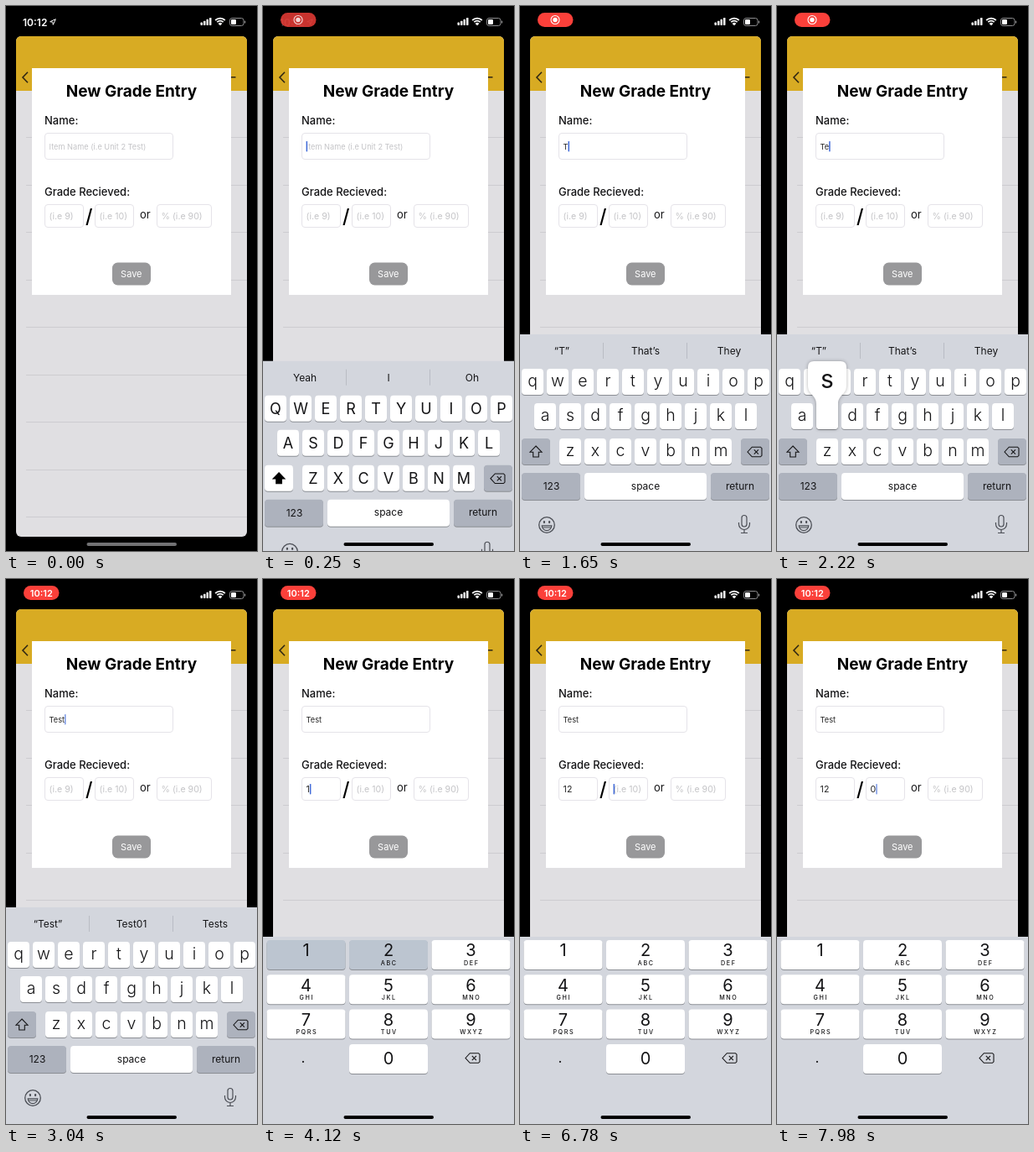
Animation of 300x649 px, one loop 8000 ms. Source, as an HTML page with a canvas:

```html
<!DOCTYPE html>
<html lang="en">
<head>
<meta charset="utf-8">
<title>New Grade Entry</title>
<style>
html, body { margin: 0; width: 100%; height: 100%; overflow: hidden; background: #000; }
canvas { display: block; width: 300px; height: 649px; }
</style>
</head>
<body>
<canvas id="stage"></canvas>
<script>
const W = 300, H = 649, LOOP = 8000;
const canvas = document.getElementById('stage');
const ctx = canvas.getContext('2d');
const ratio = window.devicePixelRatio || 1;
canvas.width = W * ratio;
canvas.height = H * ratio;

const KEYBOARD_BG = '#d3d6dd', DARK_KEY = '#adb2bd', INK = '#141416';

// key, touch down, touch up
const taps = [
  ['t', 1430, 1560], ['e', 1880, 2000], ['s', 2140, 2270], ['t', 2420, 2540],
  ['1', 3930, 4080], ['2', 4100, 4240], ['1', 5000, 5120], ['2', 5170, 5290],
  ['<', 6240, 6360], ['<', 6560, 6680], ['0', 7420, 7480]
];
// time, field index
const focuses = [[60, 0], [3480, 1], [4620, 2]];
const suggestions = [
  [0, 'Yeah', 'I', 'Oh'],
  [1650, '“T”', 'That’s', 'They'],
  [2350, '“Tes”', 'Test', 'Tests'],
  [2620, '“Test”', 'Test01', 'Tests']
];
const fields = [
  { x: 46, y: 151, w: 154, h: 32, size: 9.2, hint: 'Item Name (i.e Unit 2 Test)', base: 170.5 },
  { x: 46, y: 236, w: 47, h: 28, size: 10.6, hint: '(i.e 9)', base: 254 },
  { x: 106, y: 236, w: 47, h: 28, size: 10.6, hint: '(i.e 10)', base: 254 },
  { x: 180, y: 236, w: 66, h: 28, size: 10.6, hint: '% (i.e 90)', base: 254 }
];

const clamp = v => Math.max(0, Math.min(1, v));
const ramp = (t, from, to) => clamp((t - from) / (to - from));
const latest = (list, t) => list.filter(e => e[0] <= t).pop();

function setFont(size, weight) {
  ctx.font = `${weight} ${size}px Inter, Roboto, sans-serif`;
}

function text(str, x, y, size, { weight = 400, color = INK, align = 'center', spacing = 0 } = {}) {
  setFont(size, weight);
  ctx.letterSpacing = spacing + 'px';
  ctx.textAlign = align;
  ctx.fillStyle = color;
  ctx.fillText(str, x + spacing / 2, y);
  ctx.letterSpacing = '0px';
}

function box(x, y, w, h, r, fill) {
  ctx.beginPath();
  ctx.roundRect(x, y, w, h, r);
  ctx.fillStyle = fill;
  ctx.fill();
}

function stroke(color, width, draw) {
  ctx.beginPath();
  draw();
  ctx.strokeStyle = color;
  ctx.lineWidth = width;
  ctx.stroke();
}

function path(points) {
  points.forEach(([x, y], i) => i ? ctx.lineTo(x, y) : ctx.moveTo(x, y));
}

function key(x, y, w, h, fill = '#fff') {
  box(x, y + 1, w, h, 4, '#8b8e94');
  box(x, y, w, h, 4, fill);
}

// Replays focus and taps up to time t
function stateAt(t) {
  const values = ['', '', '', ''];
  const focus = latest(focuses, t);
  let edited = focus ? focus[0] : 0;
  for (const [name, , up] of taps) {
    if (up > t) break;
    const i = latest(focuses, up)[1];
    values[i] = name === '<' ? values[i].slice(0, -1)
      : values[i] + (name === 't' && !values[i] ? 'T' : name);
    edited = Math.max(edited, up);
  }
  return { values, active: focus ? focus[1] : -1, edited };
}

function caretAlpha(since) {
  const s = since % 1000;
  const shown = 1 - ramp(s, 450, 620) + ramp(s, 860, 1000);
  return clamp(shown);
}

function drawStatus(t) {
  const pill = ramp(t, 60, 300), clock = ramp(t, 2500, 2800);
  ctx.globalAlpha = 1 - pill;
  text('10:12', 20, 23.5, 12, { weight: 600, color: '#fff', align: 'left' });
  stroke('#fff', 1, () => { path([[52.7, 18.7], [59.3, 15.7], [56.3, 22.3], [55.8, 19.2]]); ctx.closePath(); });
  ctx.globalAlpha = pill;
  box(21, 8, 42.5, 17, 8.5, '#fb403a');
  ctx.globalAlpha = pill * (1 - clock);
  stroke('#fff', 1.1, () => ctx.arc(42, 16.5, 5, 0, 7));
  box(39.3, 13.8, 5.4, 5.4, 2.7, '#fff');
  ctx.globalAlpha = clock;
  text('10:12', 42.3, 20.6, 11, { weight: 600, color: '#fff' });
  ctx.globalAlpha = 1;

  for (let i = 0; i < 4; i++) {
    const h = 3.4 + i * 1.9;
    box(232.5 + i * 3.5, 23 - h, 2.5, h, 0.7, '#fff');
  }
  for (const r of [8.2, 5.2]) {
    stroke('#fff', 1.8, () => ctx.arc(256, 22.8, r, -Math.PI * 0.75, -Math.PI * 0.25));
  }
  ctx.beginPath();
  ctx.moveTo(256, 23.3);
  ctx.arc(256, 23.3, 3.3, -Math.PI * 0.75, -Math.PI * 0.25);
  ctx.fillStyle = '#fff';
  ctx.fill();
  stroke('#8c8c8e', 1, () => ctx.roundRect(267.5, 14.5, 16.5, 9, 2.6));
  box(269, 16, 6, 6, 1.2, '#fff');
  box(285, 17.5, 1.2, 3, 0.6, '#8c8c8e');
}

function drawPage() {
  box(12, 36, 276, 596, 6, '#e0dfe2');
  box(12, 36, 276, 65, [6, 6, 0, 0], '#d8ab23');
  for (let i = 0; i < 9; i++) {
    box(24, Math.round(156 + i * 56.5), 264, 1, 0, '#cdccd0');
  }
  stroke('#302713', 1.6, () => path([[26, 78.8], [20, 85], [26, 91.2]]));
  stroke('#302713', 1.5, () => path([[268, 84.8], [274.5, 84.8]]));
}

function drawField(f, value, alpha) {
  stroke('#e5e3e9', 1, () => ctx.roundRect(f.x + 0.5, f.y + 0.5, f.w - 1, f.h - 1, 3.5));
  const x = f.x + 5.6;
  text(value || f.hint, x, f.base, f.size, { color: value ? '#222' : '#c4c4c7', align: 'left' });
  if (!alpha) return;
  const end = x + (value ? ctx.measureText(value).width : 0);
  ctx.globalAlpha = alpha;
  box(end, f.base - f.size * 0.36 - 6.3, 1.5, 12.6, 0.7, '#3f69d8');
  ctx.globalAlpha = 1;
}

function drawCard(t, { values, active, edited }) {
  box(31, 74, 238, 270, 0, '#fff');
  text('New Grade Entry', 150, 108, 19, { weight: 700, color: '#000' });
  text('Name:', 46, 141, 13, { weight: 500, align: 'left' });
  text('Grade Recieved:', 46, 226, 13, { weight: 500, align: 'left' });
  text('/', 99.3, 259, 23, { weight: 500, color: '#000' });
  text('or', 160, 253, 13, { align: 'left' });
  fields.forEach((f, i) => drawField(f, values[i], i === active ? caretAlpha(t - edited) : 0));
  const ready = values[0] && values[1] && Number(values[2]) > 0;
  box(127, 305.5, 46, 27, 6.5, ready ? '#75c344' : '#98989a');
  text('Save', 149.8, 323, 11, { color: '#fff' });
}

function drawBackspace(x, y, pressed) {
  const outline = () => {
    path([[x - 8.5, y], [x - 3.2, y - 5.8], [x + 7, y - 5.8], [x + 8.5, y - 4.3],
      [x + 8.5, y + 4.3], [x + 7, y + 5.8], [x - 3.2, y + 5.8]]);
    ctx.closePath();
  };
  stroke(INK, 1.1, outline);
  if (pressed) {
    ctx.fillStyle = INK;
    ctx.fill();
  }
  stroke(pressed ? KEYBOARD_BG : INK, 1.1, () => {
    path([[x - 0.7, y - 2.6], [x + 4.5, y + 2.6]]);
    path([[x + 4.5, y - 2.6], [x - 0.7, y + 2.6]]);
  });
}

function drawShift(on) {
  key(2, 515, 34, 31, on ? '#fff' : DARK_KEY);
  const arrow = () => {
    path([[19, 524], [26, 531.2], [22.3, 531.2], [22.3, 537], [15.7, 537], [15.7, 531.2], [12, 531.2]]);
    ctx.closePath();
  };
  stroke(on ? '#000' : INK, 1.1, arrow);
  if (on) {
    ctx.fillStyle = '#000';
    ctx.fill();
  }
}

function drawPopup(label, x, y) {
  const cx = x + 13, top = y - 50;
  ctx.beginPath();
  ctx.moveTo(cx - 16, top);
  ctx.lineTo(cx + 16, top);
  ctx.quadraticCurveTo(cx + 23, top, cx + 23, top + 7);
  ctx.lineTo(cx + 23, top + 29);
  ctx.bezierCurveTo(cx + 23, top + 40, cx + 13, top + 40, cx + 13, top + 51);
  ctx.lineTo(cx + 13, y + 27);
  ctx.quadraticCurveTo(cx + 13, y + 31, cx + 9, y + 31);
  ctx.lineTo(cx - 9, y + 31);
  ctx.quadraticCurveTo(cx - 13, y + 31, cx - 13, y + 27);
  ctx.lineTo(cx - 13, top + 51);
  ctx.bezierCurveTo(cx - 13, top + 40, cx - 23, top + 40, cx - 23, top + 29);
  ctx.lineTo(cx - 23, top + 7);
  ctx.quadraticCurveTo(cx - 23, top, cx - 16, top);
  ctx.save();
  ctx.shadowColor = 'rgba(0,0,0,.3)';
  ctx.shadowBlur = 4 * ratio;
  ctx.fillStyle = '#fff';
  ctx.fill();
  ctx.restore();
  const upper = label !== label.toLowerCase();
  text(label, cx, y - (upper ? 17 : 18), upper ? 27 : 30);
}

function drawFooter() {
  const gray = '#4b4e55';
  stroke(gray, 1.3, () => ctx.arc(32, 618, 9.3, 0, 7));
  box(27.8, 613, 2.2, 3.2, 1.1, gray);
  box(34, 613, 2.2, 3.2, 1.1, gray);
  stroke(gray, 1.2, () => {
    ctx.arc(32, 618.8, 5.8, 0, Math.PI);
    ctx.closePath();
  });
  stroke(gray, 1, () => path([[27, 621], [37, 621]]));
  stroke(gray, 1.2, () => ctx.roundRect(265, 606.5, 6, 13.5, 3));
  stroke(gray, 1.2, () => {
    ctx.moveTo(261.5, 615);
    ctx.lineTo(261.5, 617);
    ctx.arc(268, 617, 6.5, Math.PI, 0, true);
    ctx.lineTo(274.5, 615);
    path([[268, 623.5], [268, 627.5]]);
    path([[264, 627.5], [272, 627.5]]);
  });
}

function drawLetters(t, upper, pressed) {
  box(0, 391, W, 258, 0, KEYBOARD_BG);
  latest(suggestions, t).slice(1).forEach((word, i) => text(word, 50 + i * 100, 415, 12));
  box(99, 401, 1, 19, 0, '#b9bcc4');
  box(199, 401, 1, 19, 0, '#b9bcc4');

  let popup = null;
  ['qwertyuiop', 'asdfghjkl', 'zxcvbnm'].forEach((row, r) => {
    const y = [432, 473, 515][r];
    [...row].forEach((name, i) => {
      const x = [2, 17, 47][r] + i * 30;
      const label = upper ? name.toUpperCase() : name;
      key(x, y, 26, 31);
      if (pressed(name)) popup = [label, x, y];
      text(label, x + 13, y + (upper ? 22 : 20.5), upper ? 18 : 19.5, { weight: upper ? 400 : 300 });
    });
  });
  drawShift(upper);
  key(264, 515, 34, 31, DARK_KEY);
  drawBackspace(280.5, 531, false);
  key(2, 556, 70, 32, DARK_KEY);
  key(77, 556, 146, 32);
  key(228, 556, 70, 32, DARK_KEY);
  text('123', 37.5, 576.3, 12);
  text('space', 150, 575.5, 12);
  text('return', 263, 575.5, 12);
  drawFooter();
  if (popup) drawPopup(...popup);
}

function drawDigits(pressed) {
  box(0, 426, W, 223, 0, KEYBOARD_BG);
  const captions = ['', 'ABC', 'DEF', 'GHI', 'JKL', 'MNO', 'PQRS', 'TUV', 'WXYZ'];
  const fill = name => pressed(name) ? '#bcc5d0' : '#fff';
  captions.forEach((caption, i) => {
    const x = 4.5 + (i % 3) * 98.5, y = 430 + Math.floor(i / 3) * 41.3;
    const name = String(i + 1);
    key(x, y, 94, 35, fill(name));
    text(name, x + 47, y + 19.3, 20);
    text(caption, x + 47, y + 29.8, 7.2, { weight: 500, spacing: 1.6 });
  });
  key(103, 554, 94, 35, fill('0'));
  text('0', 150, 578.2, 20);
  text('.', 48, 576, 17);
  drawBackspace(250.5, 570.5, pressed('<'));
}

function render(t) {
  ctx.setTransform(ratio, 0, 0, ratio, 0, 0);
  ctx.fillStyle = '#000';
  ctx.fillRect(0, 0, W, H);
  const state = stateAt(t);
  const pressed = name => taps.some(([k, down, up]) => k === name && t >= down && t < up + 60);
  drawPage();
  drawCard(t, state);
  drawStatus(t);

  const rise = 1 - Math.pow(1 - ramp(t, 60, 440), 3);
  ctx.save();
  ctx.translate(0, (1 - rise) * 258);
  if (state.active > 0) drawDigits(pressed);
  else if (rise > 0) drawLetters(t, !state.values[0], pressed);
  ctx.restore();
  box(96.5, 639, 107.5, 4, 2, rise > 0.1 ? '#000' : '#727274');
}

function tick(now) {
  render(now % LOOP);
  requestAnimationFrame(tick);
}
render(0);
requestAnimationFrame(tick);
</script>
</body>
</html>
```
